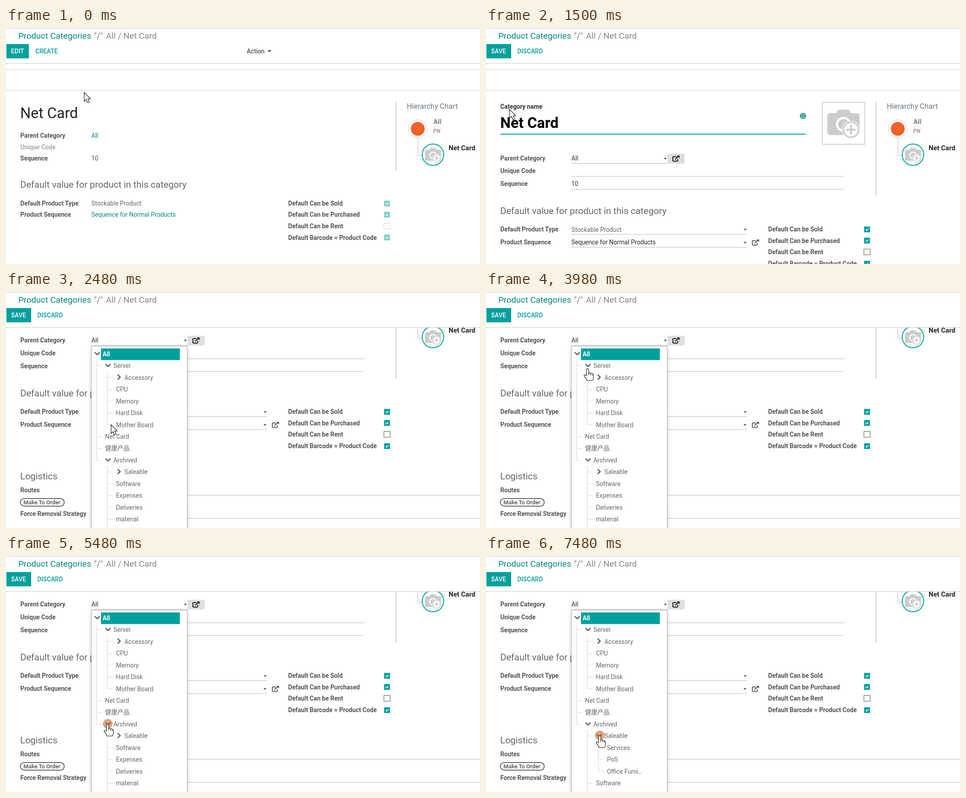
Write an HTML page that moves like this. It is 1058 px wide and 529 px high and loops after 8000 ms.

```html
<!DOCTYPE html>
<html lang="en">
<head>
<meta charset="utf-8">
<title>Category form</title>
<style>
html, body { margin: 0; width: 100%; height: 100%; overflow: hidden; background: #fff; }
svg { display: block; width: 1058px; height: 529px; font-family: Roboto, "Noto Sans CJK SC", "Noto Sans CJK", sans-serif; }
.menu { filter: drop-shadow(0 5px 5px rgba(0, 0, 0, .2)); }
</style>
</head>
<body>
<svg id="stage" viewBox="0 0 1058 529"></svg>
<script>
const TEAL = '#00a09d', LINK = '#008784', GREY = '#555', SIZE = 13.75;

// y is the middle of the capitals
const text = (x, y, s, fill = GREY, weight = 400, size = SIZE) =>
  `<text x="${x}" y="${y + size * .356}" fill="${fill}" font-weight="${weight}" font-size="${size}">${s}</text>`;
const label = (y, s, fill, x = 32) => text(x, y, s, fill, 700);
const heading = (y, s) => text(31.7, y, s, '#666', 400, 20.6);
const rect = (x, y, w, h, fill, more = '') =>
  `<rect x="${x}" y="${y}" width="${w}" height="${h}" fill="${fill}" ${more}/>`;
const path = (d, stroke, width = 1, more = '') =>
  `<path d="${d}" fill="none" stroke="${stroke}" stroke-width="${width}" ${more}/>`;
const circle = (x, y, r, fill, more = '') => `<circle cx="${x}" cy="${y}" r="${r}" fill="${fill}" ${more}/>`;
const shift = (x, y, s, scale = 1) => `<g transform="translate(${x} ${y}) scale(${scale})">${s}</g>`;
const dots = (d, color = '#aaa') => path(d, color, 1, 'stroke-dasharray="1 1"');
const rule = (y, x1, x2, color = '#b8b8b8') => path(`M${x1} ${y}H${x2}`, color);
const caret = (x, y, r = 3.5, fill = '#444') => `<path d="M${x - r} ${y - r / 2}h${2 * r}l${-r} ${r}z" fill="${fill}"/>`;
const chevron = (x, y, open) =>
  path(open ? `M${x - 5.5} ${y - 3}l5.5 5.5 5.5-5.5` : `M${x - 3} ${y - 5.5}l5.5 5.5-5.5 5.5`, '#555', 2.4);

const camera = (x, y, scale) => shift(x, y,
  rect(-36, -22, 72, 49, '#ccc', 'rx="6"') +
  '<path d="M-17-20l4-8q1-2 4-2H9q3 0 4 2l4 8z" fill="#ccc"/>' +
  circle(0, 3, 14.5, '#ccc', 'stroke="#fff" stroke-width="5"') +
  circle(16.5, 15, 20, '#fff') +
  circle(16.5, 15, 17, '#fff', 'stroke="#ccc" stroke-width="3.5"') +
  path('M16.5 4.5v21M6 15h21', '#ccc', 4.5), scale);

const linkIcon = (x, y, color) => shift(x, y,
  path('M1-4.5h-6.5q-1.5 0-1.5 1.5v7q0 1.5 1.5 1.5h8q1.5 0 1.5-1.5v-3.5M-2 1.5L6-6', color, 1.9) +
  `<path d="M2-7h6v6z" fill="${color}"/>`);

const globe = (x, y) => shift(x, y, circle(0, 0, 7, LINK) +
  path('M-7-2.5H7M-7 2.5H7M0-7V7M-2-7q-3 7 0 14M2-7q3 7 0 14', '#fff', .7));

function checkbox(y, checked, color) {
  const x = 850.5;
  if (!checked) return rect(x - 7, y - 6.5, 14, 13, '#fff', `stroke="${color}"`);
  return rect(x - 6.5, y - 6, 13, 13, color) + path(`M${x - 3} ${y + .5}l2.2 2.3 4-4.3`, '#fff', 1.6);
}

const checks = (top, on, off) => ['Sold', 'Purchased', 'Rent', 'Barcode = Product Code'].map((s, i) => {
  const y = top + 25.6 * i;
  return label(y, 'Default ' + (i < 3 ? 'Can be ' : '') + s, GREY, 629.7) +
    checkbox(Math.floor(y), i !== 2, i === 2 ? off : on);
}).join('');

const chart = bottom =>
  dots(`M870.5 166V${bottom}`, '#555') +
  text(894.5, 175, 'Hierarchy Chart', '#6c757d', 400, 16.5) +
  circle(919, 226, 20.5, '#fff', 'stroke="#ccc"') +
  circle(919, 226, 15.5, '#f2622c') +
  path('M919.5 247V286.5H929', '#bbb') +
  text(954, 209.5, 'All', '#7c838a', 700, 15) +
  text(953.5, 231, 'PN', '#999', 700, 12) +
  circle(953, 284, 24, '#fff', `stroke="${TEAL}" stroke-width="2"`) +
  camera(953, 284, .5) +
  text(988, 269, 'Net Card', '#212529', 700, 15.1);

const bands = dots('M0 93.5H1058M0 139.5H1058', '#999');

const viewForm = () => bands +
  text(31.7, 190.5, 'Net Card', '#212529', 400, 33) +
  label(241, 'Parent Category') + text(190.5, 241, 'All', LINK) +
  label(267, 'Unique Code', '#aaa') +
  label(292, 'Sequence') + text(190.5, 292, '10') +
  heading(351, 'Default value for product in this category') +
  label(393, 'Default Product Type') + text(190.5, 393, 'Stockable Product', '#666') +
  label(418.5, 'Product Sequence') + text(190.5, 418.5, 'Sequence for Normal Products', LINK) +
  checks(393, '#7fcfcd', '#ccc') + chart(320);

const parentRow = () =>
  label(292.5, 'Parent Category') + text(190.5, 292.5, 'All', '#333') +
  rule(303.5, 190, 405) + caret(400.5, 293) +
  rect(405, 282, 38, 22, '#dededc') + linkIcon(424, 293, '#111');

const editForm = scroll => shift(0, -scroll, bands +
  label(176, 'Category name', '#333') +
  text(31.7, 212, 'Net Card', '#000', 700, 33) +
  path('M32 238H713', TEAL, 2) + globe(707.5, 197) +
  rect(750.5, 166.5, 95, 94, '#fff', 'stroke="#aaa"') + camera(798, 213, 1) +
  shift(0, scroll ? -1 : 0, parentRow()) +
  label(320, 'Unique Code') + rule(332.5, 190, 798) +
  label(349, 'Sequence') + text(190.5, 349.5, '10', '#333') + rule(361.5, 190, 798) +
  heading(409.5, 'Default value for product in this category') +
  label(451, 'Default Product Type') + text(191, 452, 'Stockable Product', '#666') +
  rule(462.5, 190, 582) + caret(578.5, 452) +
  label(480, 'Product Sequence') + text(190.5, 480, 'Sequence for Normal Products', '#222') +
  rule(491.5, 190, 582) + caret(578, 481) + linkIcon(601.5, 481, '#555') +
  checks(451.2, TEAL, '#555') + chart(378) +
  heading(595.5, 'Logistics') +
  label(627, 'Routes') + rule(638.5, 190, 1058) +
  rect(32, 646, 98, 17, '#fff', 'rx="8.5" stroke="#666" stroke-width="2"') +
  text(39, 654.5, 'Make To Order', '#666', 700, 12.6) +
  label(680.5, 'Force Removal Strategy') + rule(690.5, 190, 1058));

const leaf = name => ({ name });
const tree = open => ({ name: 'All', open: true, kids: [
  { name: 'Server', open: true, kids: [
    { name: 'Accessory', kids: [] }, ...['CPU', 'Memory', 'Hard Disk', 'Mother Board'].map(leaf)] },
  leaf('Net Card'), leaf('健康产品'),
  { name: 'Archived', open: open.archived, kids: [
    { name: 'Saleable', open: open.saleable, kids: ['Services', 'PoS', 'Office Furni…'].map(leaf) },
    ...['Software', 'Expenses', 'Deliveries', 'material', 'Consumable'].map(leaf)] }
] });

function menu(open) {
  let row = 0, out = '';
  const walk = (node, depth) => {
    const y = 139 + 26.45 * row++, x = 203.5 + 24.4 * depth;
    if (!depth) out += rect(212, 126.5, 176, 26, TEAL) + text(215.5, y, node.name, '#fff', 700);
    else out += text(node.kids ? x + 12 : x - 6.8, y, node.name, '#666');
    if (node.kids) out += chevron(x, y - 1, node.open);
    if (!node.open) return y;
    const trunk = Math.floor(x - 1) + .5;
    let last = y;
    for (const kid of node.kids) {
      last = Math.floor(walk(kid, depth + 1)) + .5;
      out += dots(`M${trunk} ${last}h11`);
    }
    out += dots(`M${trunk} ${Math.round(y + 13)}V${last}`);
    return y;
  };
  walk(tree(open), 0);
  const height = 26.45 * row + 10;
  return `<g class="menu">${rect(190.5, 121.5, 214, height, '#fff', 'stroke="#aaa"')}</g>` + out;
}

const button = (w, s, fill) => rect(1, 36, w, 32, fill) + text(11.3, 52.5, s, '#fff', 500);

const header = (editing, hover) => rect(0, 0, 1058, 80, '#fff') +
  rule(.5, 0, 1058, '#ccc') + rule(79.5, 0, 1058, '#c8c8c8') +
  text(27.5, 17, 'Product Categories', LINK, 400, 19) +
  text(196.3, 17, '"/"', '#777', 400, 19) +
  text(223.3, 17, 'All / Net Card', '#888', 400, 19) +
  (editing
    ? button(55, 'SAVE', TEAL) + text(70, 52.5, 'DISCARD', TEAL, 500)
    : button(50, 'EDIT', hover ? '#017e7c' : TEAL) + text(65.7, 52.5, 'CREATE', TEAL, 500) +
      text(537.3, 52.5, 'Action', GREY, 500) + caret(588, 52, 4.5));

const pointers = {
  arrow: 'M.5 .5V20.5L5 16 8.4 23.5 11.8 22 8.7 14.6H14.6Z',
  hand: 'M-2.8 17V3.2a2.5 2.5 0 0 1 5 0V11a2.3 2.3 0 0 1 4.2 .8a2.1 2.1 0 0 1 3.7 1a1.9 1.9 0 0 1 2.7 1.8V20q0 4-2.4 7.5H-1.5q-1-4-6-9.5-1.3-3 1-3.4 1.7 0 3.7 2.4z'
};
const pointer = ([kind, x, y]) => shift(x, y,
  `<path d="${pointers[kind]}" fill="#fff" stroke="#1c1c28" stroke-width="1.2" stroke-linejoin="round"/>` +
  (kind === 'hand' ? path('M2.2 11v4M6.4 12v3.5M10.1 13.5v3', '#1c1c28', 1.1) : ''));
const click = (x, y) => circle(x, y, 10.7, 'rgb(197,91,19)', 'fill-opacity=".55"');

const overArchived = ['hand', 227, 376], overSaleable = ['hand', 254, 402];
const full = { archived: true };
// each step holds from its start time until the next one
const steps = [
  { at: 0, cursor: ['arrow', 174, 144] },
  { at: 500, cursor: ['hand', 24, 53], hover: true },
  { at: 980, cursor: ['hand', 24, 53], hover: true, press: true },
  { at: 1500, edit: true, cursor: ['arrow', 52, 182] },
  { at: 2000, edit: true, cursor: ['hand', 240, 294.5] },
  { at: 2480, open: full, cursor: ['arrow', 234, 297] },
  { at: 2980, open: full, cursor: ['arrow', 232, 221] },
  { at: 3500, open: full, cursor: ['arrow', 229, 175] },
  { at: 3980, open: full, cursor: ['hand', 227, 171] },
  { at: 4480, open: full, cursor: overArchived, press: true },
  { at: 5000, open: full, cursor: overArchived },
  { at: 5480, open: full, cursor: overArchived, press: true },
  { at: 5980, open: {}, cursor: overArchived, press: true },
  { at: 6480, open: full, cursor: ['hand', 235, 368] },
  { at: 6980, open: full, cursor: overSaleable },
  { at: 7480, open: { archived: true, saleable: true }, cursor: overSaleable, press: true }
];

function draw({ edit, open, hover, press, cursor }) {
  const editing = edit || open;
  return (editing ? editForm(open ? 183 : 0) : viewForm()) +
    header(editing, hover) +
    (open ? menu(open) : '') +
    (press ? click(cursor[1], cursor[2]) : '') +
    pointer(cursor);
}

const stage = document.getElementById('stage');
let shown;
function tick() {
  const now = performance.now() % 8000;
  const step = steps.findLast(s => s.at <= now);
  if (step !== shown) stage.innerHTML = draw(shown = step);
  requestAnimationFrame(tick);
}
tick();
</script>
</body>
</html>
```
